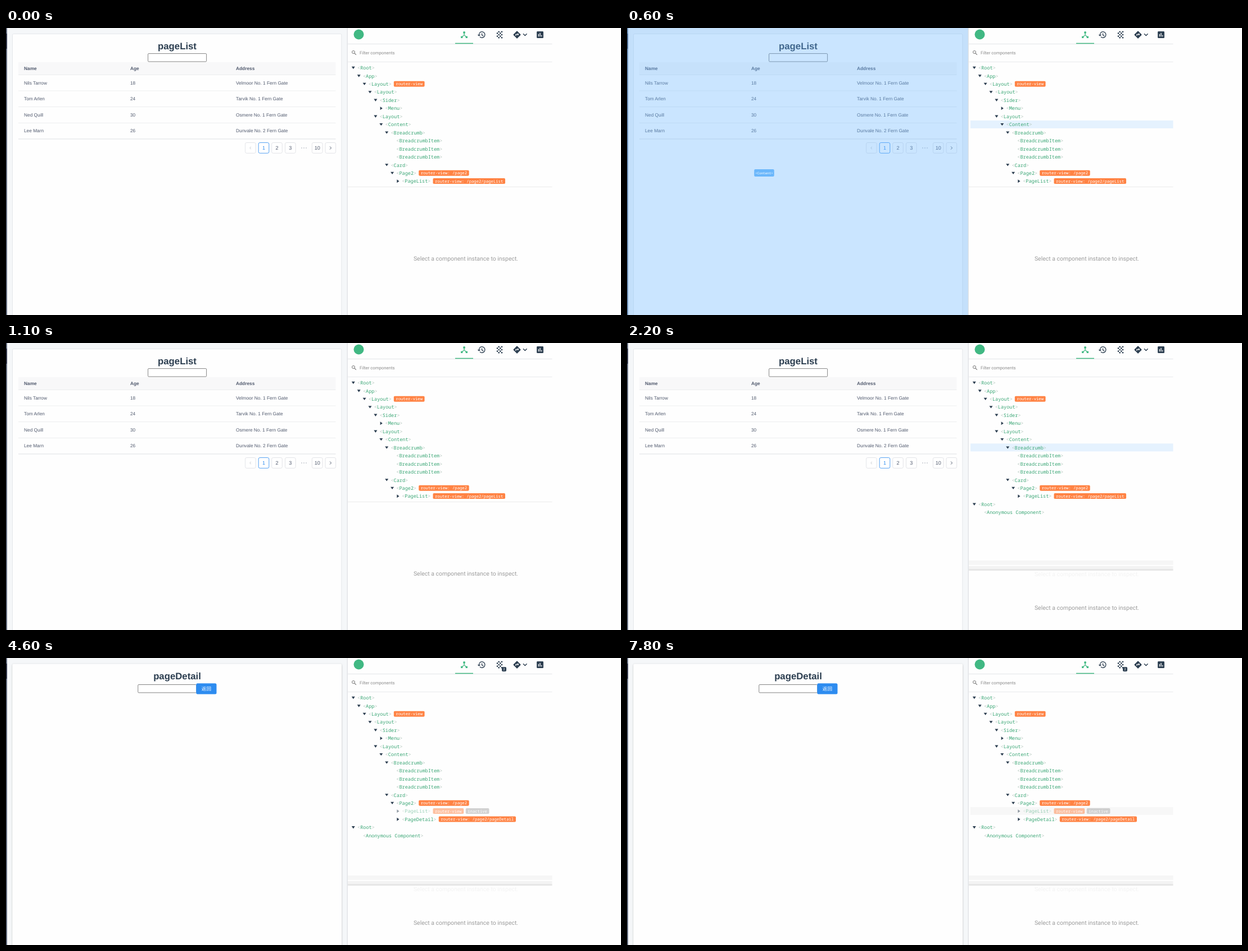
Write an HTML page that moves like this. It is 1094x512 px and loops after 8000 ms.

```html
<!DOCTYPE html>
<html lang="en">
<head>
<meta charset="utf-8">
<title>Component inspector</title>
<style>
html, body { margin: 0; width: 100%; height: 100%; overflow: hidden; background: #fefefe; }
svg { display: block; width: 1094px; height: 512px; text-rendering: geometricPrecision; }
.sans { font-family: "Liberation Sans", Arial, sans-serif; }
.ui { font-family: Roboto, sans-serif; }
.mono { font-family: "Noto Sans Mono", monospace; }
.cjk { font-family: "Noto Sans CJK SC", "Noto Sans CJK", sans-serif; }
</style>
</head>
<body>
<svg id="stage" viewBox="0 0 1094 512" xmlns="http://www.w3.org/2000/svg">
  <defs>
    <filter id="shadow" x="-5%" y="-5%" width="110%" height="110%">
      <feDropShadow dx="0" dy="0.7" stdDeviation="1.8" flood-color="#000" flood-opacity=".25"/>
    </filter>
  </defs>
  <g id="page"></g>
  <g id="overlay"></g>
  <g id="tools"></g>
</svg>
<script>
const LOOP = 8000;
const INK = '#2c3e50', GREEN = '#42b983', BLUE = '#2d8cf0', ORANGE = '#ff8344', GREY = '#515a6e';
const CHAR = 5.13, BADGE_CHAR = 4.34, ROW = 14.45;

const people = [
  ['Nils Tarrow', 18, 'Velmoor No. 1 Fern Gate'],
  ['Tom Arlen', 24, 'Tarvik No. 1 Fern Gate'],
  ['Ned Quill', 30, 'Osmere No. 1 Fern Gate'],
  ['Lee Marn', 26, 'Dunvale No. 2 Fern Gate']
];

// name, depth, arrow, badge
const baseTree = [
  ['Root', 0, 'v'], ['App', 1, 'v'], ['Layout', 2, 'v', 'router-view'], ['Layout', 3, 'v'],
  ['Sider', 4, 'v'], ['Menu', 5, '>'], ['Layout', 4, 'v'], ['Content', 5, 'v'],
  ['Breadcrumb', 6, 'v'], ['BreadcrumbItem', 7], ['BreadcrumbItem', 7], ['BreadcrumbItem', 7],
  ['Card', 6, 'v'], ['Page2', 7, 'v', 'router-view: /page2']
];
const listRow = ['PageList', 8, '>', 'router-view: /page2/pageList'];
const idleRow = ['PageList', 8, '>', 'router-view', true];
const detailRow = ['PageDetail', 8, '>', 'router-view: /page2/pageDetail'];
const extraRows = [['Root', 0, 'v'], ['Anonymous Component', 1]];

// overlay areas: x, y, right, bottom
const whole = [-119, 0, 607, 517], card = [11, 10, 597, 512];
const list = [21, 20, 587, 224], detail = [21, 20, 587, 65];

const start = {
  detail: false, detailTree: false, shadow: false, row: -1, over: null, label: '', split: 283,
  ring: 0, typed: '', caret: false, hover: false, idleFill: ''
};

const events = [
  [300, { row: 2, over: whole, label: 'Root' }],
  [400, { row: 7, label: 'Layout' }],
  [600, { label: 'Content' }],
  [800, { row: 8, over: null }],
  [900, { row: 12, over: card, label: 'Card' }],
  [1000, { row: 14, over: list, label: 'PageList' }],
  [1100, { row: -1, over: null }],
  [1600, { split: 330 }],
  [1700, { split: 388 }],
  [1800, { split: 405 }],
  [2100, { row: 9 }],
  [2200, { row: 8 }],
  [2300, { row: -1, shadow: true }],
  [2600, { ring: 1 }],
  [2800, { ring: 2, caret: true }],
  [3200, { typed: 'fd' }],
  [3500, { typed: 'fdfd' }],
  [3800, { typed: 'fdfdf' }],
  [3900, { typed: 'fdfdfd' }],
  [4200, { hover: true }],
  [4400, { detail: true }],
  [4500, { detailTree: true }],
  [5700, { shadow: false, row: 7 }],
  [5800, { over: whole, label: 'Content' }],
  [5900, { row: 13, over: card, label: 'Card' }],
  [6000, { row: 15, over: detail, label: 'PageDetail' }],
  [6200, { row: 14, over: null }],
  [6700, { row: 15 }],
  [6800, { over: detail, label: 'PageDetail' }],
  [7200, { row: -1, over: null, idleFill: '#f7f7f7' }],
  [7800, { shadow: true }]
];

const attrs = o => Object.entries(o).map(([k, v]) => `${k}="${v}"`).join(' ');
const rect = (x, y, w, h, fill, o = {}) =>
  `<rect x="${x}" y="${y}" width="${w}" height="${h}" fill="${fill}" ${attrs(o)}/>`;
const path = (d, o = {}) => `<path d="${d}" ${attrs({ fill: 'none', ...o })}/>`;
const dot = (x, y, r, fill) => `<circle cx="${x}" cy="${y}" r="${r}" fill="${fill}"/>`;
const text = (s, x, y, size, fill, font, o = {}) =>
  `<text x="${x}" y="${y}" font-size="${size}" fill="${fill}" class="${font}" ${attrs(o)}>${s}</text>`;
const bold = { 'font-weight': 700 }, mid = { 'text-anchor': 'middle' };

function heading(s) {
  return text(s, 304.5, 38.4, 16.75, INK, 'sans', { ...bold, ...mid });
}

function field(x, y, ring = 0) {
  if (ring === 2) return rect(x + .5, y + .5, 103, 13.6, '#fff', { stroke: '#101010', 'stroke-width': 2, rx: 1.5 });
  return rect(x, y, 104, 14.4, '#fff', { stroke: ring ? '#4a4a4a' : '#767676', 'stroke-width': .9, rx: 1.3 });
}

function pager() {
  const button = (x, s, stroke, fill) =>
    rect(x, 204.5, 18.6, 18.8, '#fff', { rx: 2.5, stroke, 'stroke-width': .8 }) +
    (s ? text(s, x + 9.3, 217.2, 9.1, fill, 'sans', mid) : '');
  const line = '#dcdee2';
  return button(425.6, '', line) + path('M436 211.8l-2.3 2.2 2.3 2.2', { stroke: '#c5c8ce', 'stroke-width': .9 }) +
    button(449.2, '1', BLUE, BLUE) + button(472.7, '2', line, GREY) + button(496.5, '3', line, GREY) +
    [526, 530, 534].map(x => dot(x, 214, .9, '#c0c4cb')).join('') +
    button(544.4, '10', line, GREY) + button(568, '', line) +
    path('M576 211.4l2.6 2.6-2.6 2.6', { stroke: GREY, 'stroke-width': 1 });
}

function table(hover) {
  const cols = [32, 221, 409];
  const cells = (row, y, o) => row.map((s, i) => text(s, cols[i], y, 8.32, GREY, 'sans', o)).join('');
  let out = rect(22, 61, 564.5, 22.3, '#f8f8f9') + cells(['Name', 'Age', 'Address'], 75, bold);
  if (hover) out += rect(22, 83.5, 564.5, 28.4, '#ebf7ff');
  people.forEach((p, i) => { out += cells(p, 100.5 + 28.65 * i); });
  for (let i = 0; i < 5; i++) out += rect(22, 83 + 28.65 * i, 564.5, .8, i < 4 ? '#e8eaec' : '#d5d8dc');
  return out;
}

function drawPage(s) {
  let out = rect(0, 0, 607, 512, '#f5f7f9') + rect(0, 0, 1.8, 512, GREY) + rect(0, 10, 1.8, 27, '#2b3042');
  out += s.shadow
    ? rect(11.5, 10.8, 585.5, 520, '#fefefe', { rx: 2, filter: 'url(#shadow)' })
    : rect(11.5, 10.5, 585.3, 520, '#fefefe', { rx: 2, stroke: '#e0e3e8', 'stroke-width': .8 });
  if (s.detail) {
    return out + heading('pageDetail') + field(234.8, 47.5) +
      rect(338.3, 45.3, 36.2, 19.3, BLUE, { rx: 2.5 }) + text('返回', 356.4, 58.2, 8.6, '#fff', 'cjk', mid);
  }
  out += heading('pageList') + table(s.hover) + field(252.6, 45.6, s.ring);
  if (s.typed) out += text(s.typed, 253.6, 56, 8.7, '#111', 'sans');
  if (s.caret) {
    const width = [...s.typed].reduce((w, c) => w + (c === 'f' ? .278 : .556) * 8.7, 0);
    out += rect(253.8 + width, 48.2, .8, 9.4, '#111');
  }
  return out + pager();
}

function drawOverlay(s) {
  if (!s.over) return '';
  const [x, y, r, b] = s.over, cx = (x + r) / 2, cy = (y + b) / 2;
  const w = (s.label.length + 2) * 3.5 + 4;
  return rect(x, y, r - x, b - y, '#68b6ff', { opacity: .35 }) +
    rect(cx - w / 2, cy - 6.4, w, 12.8, '#6bb7fb', { rx: 2 }) +
    text(`&lt;${s.label}&gt;`, cx, cy + 2.4, 5.8, '#fff', 'mono', mid);
}

function icons() {
  const at = (x, body) => `<g transform="translate(${x - 7.9} 4.1) scale(.66)">${body}</g>`;
  const pen = (c, w = 2) => ({ stroke: c, 'stroke-width': w });
  let grain = '';
  for (let c = 0; c < 4; c++)
    for (let y = c % 2 ? 4 : 8; y <= 20; y += 8) grain += dot(6 + 4 * c, y, 2, INK);
  return at(815, dot(12, 6, 3, GREEN) + path('M12 7v5.5L5 19.5M12 12.5l7 7', pen(GREEN)) +
      rect(3, 16, 5, 5, GREEN) + rect(16, 16, 5, 5, GREEN)) +
    at(846, path('M5 12a8 8 0 1 1 2.4 5.7M12.8 8v5l4 2.4', pen(INK)) + path('M1 12h8l-4 4z', { fill: INK })) +
    at(878, grain) +
    at(909, path('M12 3l9 9-9 9-9-9z', { fill: INK, stroke: INK, 'stroke-width': 2, 'stroke-linejoin': 'round' }) +
      path('M9 15v-4h5', pen('#fff')) + path('M13.5 7.5L17 11l-3.500 3.500z', { fill: '#fff' })) +
    path('M920 10.300l3.300 3.300 3.300-3.300', pen(INK, 1.4)) +
    at(950, rect(3, 3, 18, 18, INK, { rx: 2 }) + path('M8 17v-7M12 17V7M16 17v-4', pen('#fff')));
}

function badge(s, x, y, fill) {
  return rect(x, y - 5.2, s.length * BADGE_CHAR + 7, 10, fill, { rx: 1.8 }) +
    text(s, x + 3.5, y + 2.5, BADGE_CHAR / .6, '#fff', 'mono', { 'font-weight': 500 });
}

function treeRow([name, depth, arrow, tag, idle], i) {
  const y = 71 + ROW * i, x = 625 + 9.9 * depth, ax = x - 7.2;
  let out = '';
  if (arrow === 'v') out += path(`M${ax - 3} ${y - 2.2}h6l-3 4.400z`, { fill: INK });
  if (arrow === '>') out += path(`M${ax - 1.700} ${y - 3}v6l4.200-3z`, { fill: INK });
  const soft = '<tspan fill="#b4c6bd">';
  out += text(`${soft}&lt;</tspan>${name}${soft}&gt;</tspan>`, x, y + 3.1, CHAR / .6, '#3aa675', 'mono');
  if (tag) {
    const bx = x + (name.length + 2) * CHAR + 4;
    out += badge(tag, bx, y, ORANGE);
    if (idle) out += badge('inactive', bx + tag.length * BADGE_CHAR + 10.500, y, '#a8a8a8');
  }
  return idle ? `<g opacity=".5">${out}</g>` : out;
}

function drawTree(s) {
  const rows = [...baseTree, ...(s.detailTree ? [idleRow, detailRow] : [listRow]), ...extraRows];
  const fillRow = (i, c) => rect(611, 71 + ROW * i - 7.2, 360.5, 14, c);
  let out = '';
  if (s.idleFill) out += fillRow(14, s.idleFill);
  if (s.row >= 0) out += fillRow(s.row, rows[s.row][4] ? '#f1f8fd' : '#e5f2fe');
  rows.forEach((r, i) => { if (71 + ROW * i + 6 < s.split) out += treeRow(r, i); });
  return out;
}

function drawPane(s) {
  const hint = (y, c) => text('Select a component instance to inspect.', 818, y, 10.48, c, 'ui', mid);
  let out = '';
  if (s.split === 405) {
    out += rect(608, 388, 363.5, 8, '#f6f6f6') + rect(608, 398, 363.5, 6, '#f3f3f3') +
      rect(608, 403.500, 363.5, 2.500, '#e4e4e4') + hint(416, '#f3f3f3');
  } else {
    out += rect(608, s.split, 363.5, .9, '#e9e9e9');
  }
  return out + hint(414.6 + (s.split - 283) / 2, '#9c9c9c');
}

function drawTools(s) {
  let out = rect(607, 0, 487, 512, '#fefefe') + rect(606.6, 0, 1.2, 512, '#dcdfe3') +
    rect(608, 28, 363.5, .9, '#e0e3e6') + rect(608, 60, 363.5, .9, '#e6e8ea') +
    rect(799, 26.700, 32, 1.500, GREEN) + dot(627.5, 11.5, 9, '#41b883') + icons();
  if (s.detail) out += rect(882, 16, 8, 8, INK, { rx: 2 }) + text('2', 886, 22.3, 6.2, '#fff', 'ui', mid);
  out += `<circle cx="618" cy="43" r="2.500" fill="none" stroke="#777"/>` +
    path('M619.800 44.800l3 3', { stroke: '#777', 'stroke-width': 1.2 }) +
    text('Filter components', 629, 46.800, 7.75, '#8c8c8c', 'ui');
  return out + drawTree(s) + drawPane(s);
}

const layers = { page: drawPage, overlay: drawOverlay, tools: drawTools };
let shown = -1;

function render(t) {
  const count = events.filter(e => e[0] <= t).length;
  if (count === shown) return;
  shown = count;
  const state = Object.assign({}, start, ...events.slice(0, count).map(e => e[1]));
  for (const id in layers) document.getElementById(id).innerHTML = layers[id](state);
}

const origin = performance.now();
function tick() {
  render((performance.now() - origin) % LOOP);
  requestAnimationFrame(tick);
}
tick();
</script>
</body>
</html>
```
